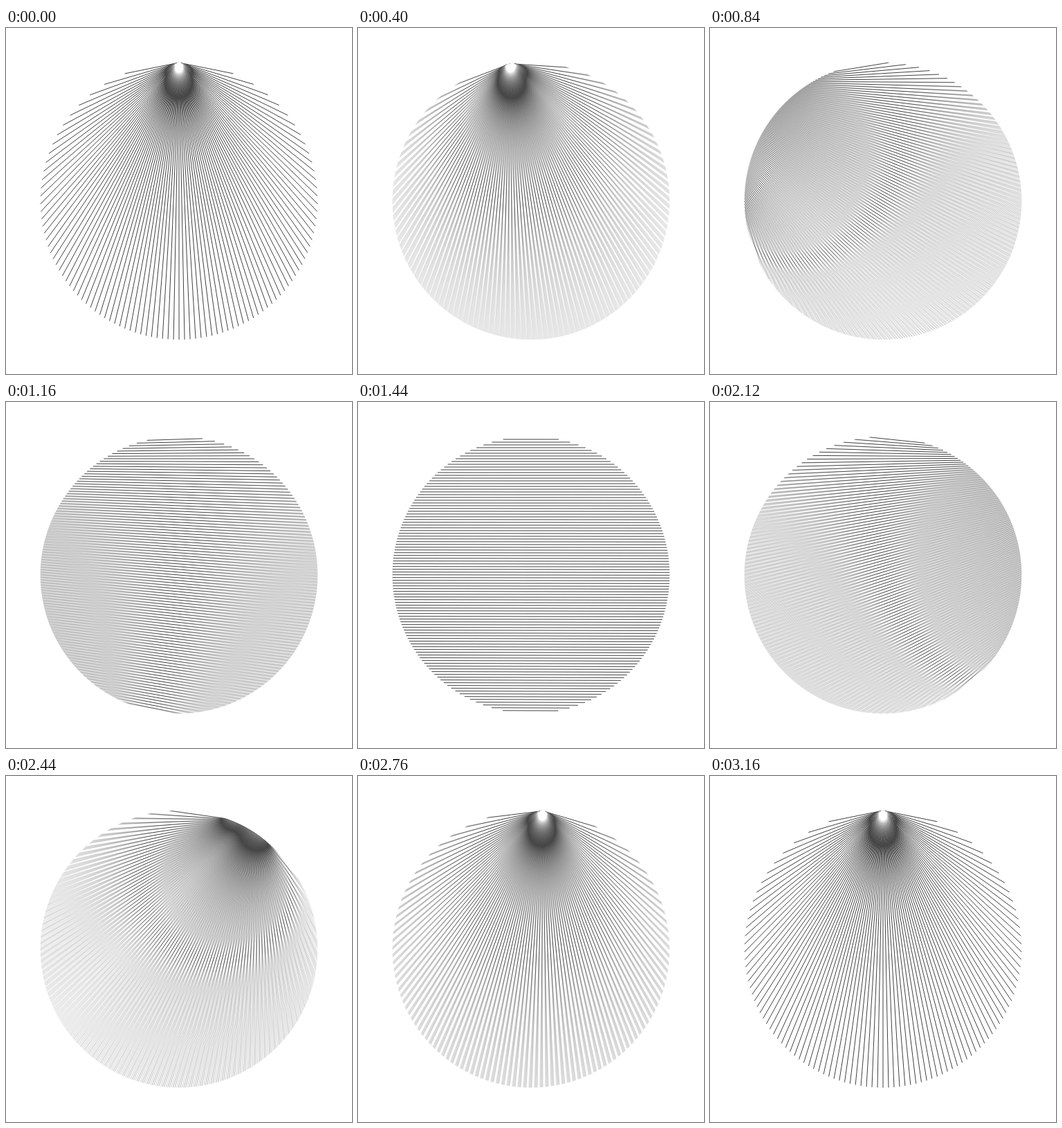
Recreate the animation shown at these times as an HTML page with a canvas. Size 500 by 500 pixels, loop 3200 ms.

```html
<!DOCTYPE html>
<html lang="en">
<head>
<meta charset="utf-8">
<title>Chords</title>
<style>
  html, body { margin: 0; width: 100%; height: 100%; overflow: hidden; background: #fff; }
  canvas { display: block; }
</style>
</head>
<body>
<canvas id="stage" width="500" height="500"></canvas>
<script>
const ctx = document.getElementById('stage').getContext('2d');
const CENTER = 250, RADIUS = 200, CHORDS = 100;
const STEP = 40, STEPS = 80, SAMPLES = 8;

const easeCubic = p => p < 0.5 ? 4 * p ** 3 : 1 - 4 * (1 - p) ** 3;

// Turn of the middle chord: upright, level at half time, upright again.
function turnAt(phase) {
  const x = 1 - 2 * (phase % 1);
  return Math.sign(x) * easeCubic(Math.abs(x)) * Math.PI / 2;
}

function addPoint(method, angle) {
  ctx[method](CENTER + RADIUS * Math.sin(angle), CENTER - RADIUS * Math.cos(angle));
}

function strokeChords(turn) {
  const spread = Math.sin(turn);
  ctx.beginPath();
  for (let k = 1; k < CHORDS; k++) {
    const half = Math.acos(1 - 2 * k / CHORDS);
    const tilt = turn + spread * (half - Math.PI / 2);
    addPoint('moveTo', tilt - half);
    addPoint('lineTo', tilt + half);
  }
  ctx.stroke();
}

// Each step averages several moments, which gives the motion blur.
function draw(step) {
  ctx.clearRect(0, 0, 500, 500);
  ctx.globalCompositeOperation = 'lighter';
  ctx.globalAlpha = 1 / SAMPLES;
  ctx.strokeStyle = '#3c3c3c';
  ctx.lineWidth = 1;
  ctx.lineCap = 'round';
  for (let j = 0; j < SAMPLES; j++) {
    strokeChords(turnAt((step + 1 + (j + 0.5) / SAMPLES) / STEPS));
  }
}

let shown = -1;
function tick() {
  const step = Math.floor(performance.now() / STEP) % STEPS;
  if (step !== shown) draw(shown = step);
  requestAnimationFrame(tick);
}
tick();
</script>
</body>
</html>
```
